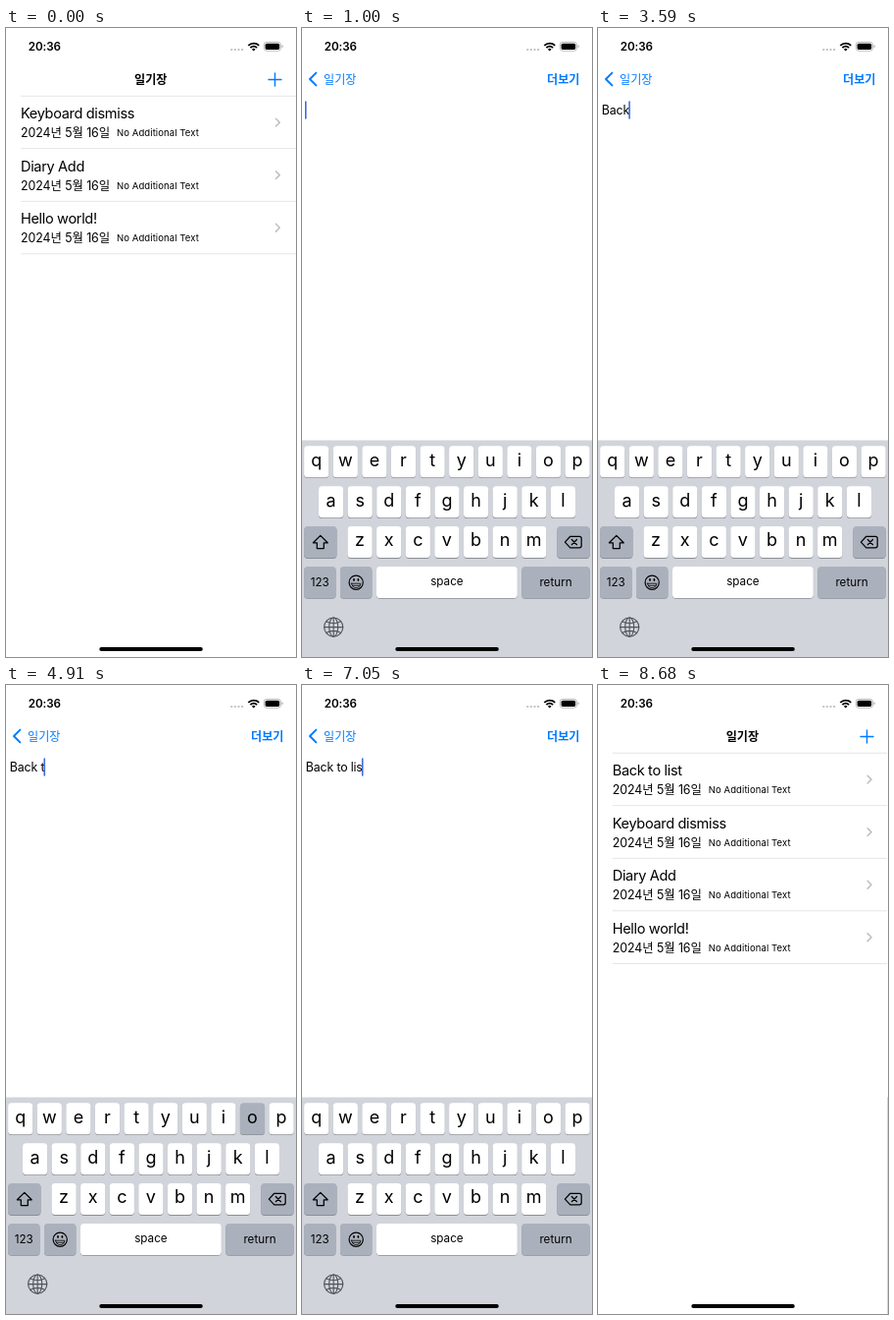
Animation of 296x640 px, one loop 9.64 s. Source, as an HTML page:

```html
<!DOCTYPE html>
<html lang="ko">
<head>
<meta charset="utf-8">
<title>Diary</title>
<style>
  html, body { margin: 0; width: 100%; height: 100%; overflow: hidden; background: #fff; }
  svg { display: block; width: 100%; height: 100%; }
  text { font-family: Inter, "Noto Sans CJK KR", "Noto Sans CJK", sans-serif; }
  .time { font-size: 11.7px; font-weight: 600; letter-spacing: -.1px; }
  .nav { font-size: 12.1px; }
  .bold { font-weight: 700; }
  .blue { fill: #007aff; }
  .title { font-size: 14.55px; letter-spacing: -.34px; }
  .date { font-size: 12.4px; letter-spacing: -.08px; }
  .note { font-size: 9.5px; letter-spacing: .09px; }
  .body { font-size: 12.4px; letter-spacing: -.17px; }
  .key { font-size: 18px; font-weight: 400; text-anchor: middle; }
  .upper .key { font-size: 16.5px; }
  .label { font-size: 11.7px; text-anchor: middle; }
  .line { fill: none; stroke-linecap: round; stroke-linejoin: round; }
  .ink { stroke: #000; }
</style>
</head>
<body>
<svg viewBox="0 0 296 640">
  <rect width="296" height="640" fill="#fff"/>
  <g id="list"></g>
  <rect id="dim" width="296" height="640"/>
  <g id="page">
    <rect width="296" height="640" fill="#fff"/>
    <text id="entry" class="body" x="3.8" y="87.8"></text>
    <rect id="caret" y="74.3" width="1.6" height="18.4" rx=".8" fill="#3c6be0"/>
  </g>
  <g id="board"></g>

  <g id="nav">
    <text id="heading" class="nav bold" x="131" y="56.5">일기장</text>
    <path id="plus" class="line" d="M268 52.5h13M274.5 46v13" stroke="#007aff" stroke-width="1.4"/>
    <path id="arrow" class="line" d="M14.4 45.6L8 52l6.4 6.4" stroke="#007aff" stroke-width="1.9"/>
    <text id="back" class="nav blue" x="22" y="56.5">일기장</text>
    <text id="more" class="nav bold blue" x="250" y="56.5">더보기</text>
  </g>

  <g id="status">
    <text class="time" x="22.8" y="23">20:36</text>
    <g fill="#b9b9bb">
      <circle cx="230.3" cy="22" r="1.1"/><circle cx="233.9" cy="22" r="1.1"/>
      <circle cx="237.5" cy="22" r="1.1"/><circle cx="241.1" cy="22" r="1.1"/>
    </g>
    <g fill="none" stroke="#000" stroke-width="1.8">
      <path d="M247.3 17.8a7.7 7.7 0 0 1 10.9 0"/>
      <path d="M249.4 20.1a4.8 4.8 0 0 1 6.7 0"/>
    </g>
    <path d="M252.75 23.6l-1.8-1.9a2.6 2.6 0 0 1 3.6 0z"/>
    <rect x="263.3" y="14.4" width="17.2" height="8.8" rx="2.7" fill="none" stroke="#a6a6a8" stroke-width=".8"/>
    <rect x="264.6" y="15.7" width="14.6" height="6.2" rx="1.6"/>
    <path d="M281.6 17.3q1.2.4 1.2 1.5t-1.2 1.5z" fill="#a6a6a8"/>
  </g>
  <rect x="95.3" y="630" width="105.5" height="4" rx="2"/>
</svg>
<script>
const LOOP = 9640, W = 296, ROW = 53.55;
const KEY = '#fff', DARK = '#abb1bc';
const PUSH = { start: 400, steps: [430, 535, 640, 750, 860, 1000] };
const POP = { start: 8300, steps: [8230, 8330, 8450, 8560, 8680] };
const CAPS = [1170, 1850];

// character, finger down, finger up
const TAPS = [
  ['B', 1730, 1850], ['a', 2230, 2330], ['c', 2770, 2910], ['k', 3360, 3475],
  [' ', 3890, 4040], ['t', 4390, 4520], ['o', 4910, 5010], [' ', 5440, 5580],
  ['l', 6000, 6150], ['i', 6380, 6530], ['s', 6930, 7050], ['t', 7370, 7510]
];

const $ = id => document.getElementById(id);
const set = (node, attrs) => { for (const k in attrs) node.setAttribute(k, attrs[k]); };

function add(parent, tag, attrs, text) {
  const node = document.createElementNS('http://www.w3.org/2000/svg', tag);
  set(node, attrs);
  if (text) node.textContent = text;
  return parent.appendChild(node);
}

// Diary list
const list = $('list');
const rule = (parent, y) => add(parent, 'rect', { x: 15, y, width: W - 15, height: .75, fill: '#dddde0' });
rule(list, 68.8);
const rows = ['', 'Keyboard dismiss', 'Diary Add', 'Hello world!'].map(name => {
  const row = add(list, 'g', {});
  const title = add(row, 'text', { class: 'title', x: 15, y: 92 }, name);
  add(row, 'text', { class: 'date', x: 15, y: 111.3 }, '2024년 5월 16일');
  add(row, 'text', { class: 'note', x: 113, y: 110.2 }, 'No Additional Text');
  add(row, 'path', { class: 'line', d: 'M275.4 92.2l3.9 3.9-3.9 3.9', stroke: '#bfbfc3', 'stroke-width': 1.5 });
  rule(row, 68.8 + ROW);
  return { row, title };
});

// Keyboard
const board = $('board');
const keys = {};
add(board, 'rect', { y: 419.5, width: W, height: 221, fill: '#d1d4da' });

function addKey(id, x, y, w, fill) {
  const box = { x, width: w, height: 32, rx: 3.6 };
  add(board, 'rect', { ...box, y: y + .8, fill: '#8b8e95' });
  keys[id] = { cap: add(board, 'rect', { ...box, y, fill }) };
}

[['qwertyuiop', 2.1], ['asdfghjkl', 17], ['zxcvbnm', 46.5]].forEach(([letters, left], r) => {
  [...letters].forEach((c, i) => {
    const x = left + i * 29.6, y = 425.3 + r * 40.9;
    addKey(c, x, y, 25.2, KEY);
    keys[c].text = add(board, 'text', { class: 'key', x: x + 12.6, y: y + 20.3 }, c);
  });
});

addKey('shift', 2.1, 507.1, 33.4, DARK);
addKey('delete', 260.3, 507.1, 33.4, DARK);
addKey('123', 2.1, 548, 32.4, DARK);
addKey('emoji', 39, 548, 32.4, DARK);
addKey(' ', 76, 548, 143.8, KEY);
addKey('return', 224.3, 548, 69.4, DARK);

const label = (x, y, text) => add(board, 'text', { class: 'label', x, y }, text);
label(18.3, 568.4, '123');
label(147.9, 567.3, 'space');
label(259, 568.2, 'return');

const draw = (d, width = 1.25) => add(board, 'path', { class: 'line ink', d, 'stroke-width': width });
const shift = draw('M18.8 516.4l7.4 7.4h-3.9v5.7h-7v-5.7h-3.9z');
draw('M273.8 517.3h9.3q2.1 0 2.1 2.1v7.4q0 2.1-2.1 2.1h-9.3l-5.4-5.8z');
draw('M275.3 520.5l5.2 5.2m0-5.2l-5.2 5.2');
add(board, 'circle', { class: 'line ink', cx: 55.2, cy: 564.2, r: 7.1, 'stroke-width': 1.2 });
draw('M50.6 565.2h9.2q-.6 4.4-4.6 4.4t-4.6-4.4zM51.4 567.3h7.6', .8);
for (const cx of [53, 57.4]) add(board, 'ellipse', { cx, cy: 561.5, rx: .9, ry: 1.4 });

const globe = add(board, 'g', { class: 'line', stroke: '#50555c', 'stroke-width': 1.1, transform: 'translate(32.2 609.6)' });
add(globe, 'circle', { r: 9.6 });
add(globe, 'ellipse', { rx: 4.5, ry: 9.6 });
add(globe, 'path', { d: 'M0-9.6v19.2M-9.6 0h19.2M-7.6-5.8q7.6 4 15.2 0M-7.6 5.8q7.6-4 15.2 0' });

// Critically damped spring: share of the way still to go
function spring(t, start) {
  const s = Math.max(0, t - start) * .021;
  return (1 + s) * Math.exp(-s);
}

const hold = (t, steps) => steps.filter(s => s <= t).pop() ?? 0;

// 1 = list in view, 0 = diary page in view
function cover(t, lag) {
  if (t < POP.steps[0]) {
    return t >= 1000 ? 0 : spring(hold(t, PUSH.steps), PUSH.start + lag);
  }
  return 1 - spring(hold(t, POP.steps), POP.start);
}

const shiftX = x => ({ transform: `translate(${x} 0)` });

function drawSlide(t) {
  const p = cover(t, 0), q = 1 - p;
  const pressed = t >= 200 && t < PUSH.steps[5];
  const leaving = t >= POP.steps[0];
  set(list, shiftX(-.29 * W * q));
  set($('dim'), { opacity: .1 * q });
  set($('page'), shiftX(W * p));
  set(board, shiftX(W * cover(t, 15)));
  set($('heading'), { ...shiftX(-109 * q), opacity: p });
  set($('back'), { ...shiftX(85 * p), opacity: q * (leaving ? .25 : 1) });
  set($('arrow'), { opacity: q * (leaving ? .25 : 1) });
  set($('more'), { opacity: q });
  set($('plus'), { opacity: p * (pressed ? .25 : 1) });
}

function drawList(t, text) {
  const fresh = t >= PUSH.steps[0];
  rows.forEach(({ row }, i) => set(row, { transform: `translate(0 ${ROW * (fresh ? i : i - 1)})` }));
  rows[0].row.style.display = fresh ? '' : 'none';
  rows[0].title.textContent = t >= POP.steps[0] ? text : '';
}

function drawKeys(t) {
  const caps = t >= CAPS[0] && t < CAPS[1];
  const tap = TAPS.find(([, down, up]) => t >= down && t < up);
  const held = tap && tap[0].toLowerCase();
  board.classList.toggle('upper', caps);
  for (const id in keys) {
    const { cap, text } = keys[id];
    if (!text && id !== ' ') continue;
    set(cap, { fill: id === held ? DARK : KEY });
    if (text) text.textContent = caps ? id.toUpperCase() : id;
  }
  set(keys.shift.cap, { fill: caps ? KEY : DARK });
  shift.style.fill = caps ? '#000' : 'none';
}

function drawEntry(t, text) {
  const entry = $('entry');
  entry.textContent = text.replace(/ /g, '\u00a0');
  set($('caret'), {
    x: 3 + (text ? entry.getComputedTextLength() : 0),
    opacity: t < 8080 ? 1 : 0
  });
}

function frame() {
  const t = performance.now() % LOOP;
  const text = TAPS.filter(([, , up]) => up <= t).map(([c]) => c).join('');
  drawSlide(t);
  drawList(t, text);
  drawKeys(t);
  drawEntry(t, text);
  requestAnimationFrame(frame);
}
frame();
</script>
</body>
</html>
```
